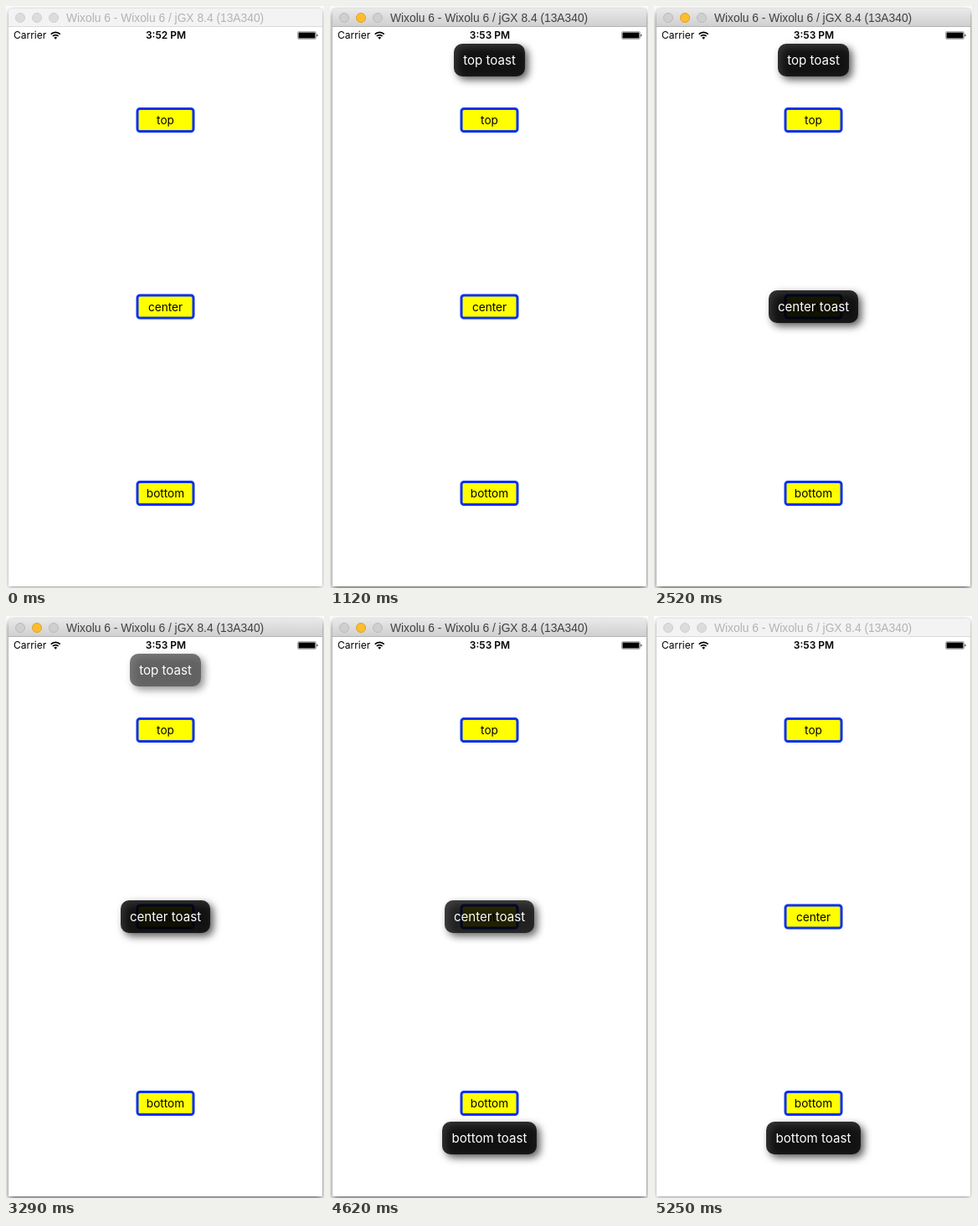
Animation, 380 px wide and 694 px high, one loop 5.32 s. Source, as an HTML page:

```html
<!DOCTYPE html>
<html lang="en">
<head>
<meta charset="utf-8">
<title>Toast demo</title>
<style>
  html, body { margin: 0; width: 100%; height: 100%; overflow: hidden; background: #fff; }
  .stage { position: relative; width: 380px; height: 694px; overflow: hidden; font-family: Inter, Roboto, sans-serif; color: #000; }
  .stage > *, .bar { position: absolute; box-sizing: border-box; white-space: nowrap; }

  /* Every state change is a hard step on one shared loop. */
  .window, .bar, .title, .dot, .before, .after, .toast { animation: 5320ms step-end infinite; }

  .window { left: 3px; top: 3px; width: 375px; height: 689px; border-radius: 4px 4px 0 0; background: #fff; animation-name: shade; }
  .bar { left: 0; top: 0; width: 100%; height: 22px; border-radius: 4px 4px 0 0; border-bottom: 1px solid; animation-name: bar; }
  .title { left: 72px; top: 5px; font: 13.8px/20px "Liberation Sans", Arial, sans-serif; animation-name: title; }
  .dot { top: 8px; width: 12px; height: 12px; border-radius: 50%; border: 1px solid; animation-name: dot; }
  .dot.mid { animation-name: dot-mid; }

  .status { top: 26px; height: 18px; line-height: 18px; font-size: 12px; }
  .clock { left: 141px; width: 100px; text-align: center; font-weight: 600; }
  .before { animation-name: before; }
  .after { animation-name: after; }
  .drawing { left: 0; top: 0; }

  .button rect { width: 67px; height: 27px; rx: 3px; fill: #ff0; stroke: #0b31f0; stroke-width: 3px; }
  .button text { font-size: 13.6px; text-anchor: middle; }

  .toast { height: 39px; line-height: 39px; border-radius: 10px; color: #fff; font-size: 15.1px; text-align: center; opacity: 0;
    background: rgba(0,0,0,.8); filter: url(#shadow); }
  .toast.top { left: 148px; top: 45px; width: 85px; animation-name: toast-top; }
  .toast.center { left: 137px; top: 339px; width: 107px; animation-name: toast-center; }
  .toast.bottom { left: 134px; top: 603px; width: 113px; animation-name: toast-bottom; }

  /* Window focus */
  @keyframes shade {
    0%, 98.68% { box-shadow: 0 0 1px rgba(0,0,0,.35), 0 2px 6px rgba(0,0,0,.35); }
    15.78% { box-shadow: 0 0 1px rgba(0,0,0,.4), 0 4px 9px rgba(0,0,0,.55); }
  }
  @keyframes bar {
    0%, 98.68% { background: #f3f3f3; border-color: #dadada; }
    15.78% { background: linear-gradient(#e9e9e9, #d0d0d0); border-color: #b4b4b4; }
  }
  @keyframes title {
    0%, 98.68% { color: #b3b3b3; }
    15.78% { color: #404040; }
  }
  @keyframes dot {
    0%, 98.68% { background: #dcdcdc; border-color: #cfcfcf; }
    15.78% { background: #cfcfcf; border-color: #bababa; }
  }
  @keyframes dot-mid {
    0%, 98.68% { background: #dcdcdc; border-color: #cfcfcf; }
    15.78% { background: #fdbd2f; border-color: #e0a025; }
  }

  /* Clock */
  @keyframes before { 0% { opacity: 1; } 15.78%, 100% { opacity: 0; } }
  @keyframes after { 0% { opacity: 0; } 15.78%, 100% { opacity: 1; } }

  /* Toasts */
  @keyframes toast-top {
    0% { opacity: 0; }
    17.1% { opacity: .25; } 18.42% { opacity: .57; } 19.73% { opacity: .88; } 21.05% { opacity: 1; }
    61.84% { opacity: .66; } 63.15% { opacity: .3; } 64.47%, 100% { opacity: 0; }
  }
  @keyframes toast-center {
    0% { opacity: 0; }
    43.42% { opacity: .33; } 44.73% { opacity: .67; } 46.05% { opacity: .94; } 47.36% { opacity: 1; }
    86.84% { opacity: .93; } 88.15% { opacity: .6; } 89.47% { opacity: .25; } 90.78%, 100% { opacity: 0; }
  }
  @keyframes toast-bottom {
    0% { opacity: 0; }
    67.1% { opacity: .23; } 68.42% { opacity: .56; } 69.73% { opacity: .88; } 71.05%, 100% { opacity: 1; }
  }
</style>
</head>
<body>
<div class="stage">
  <div class="window"><div class="bar"></div></div>
  <div class="dot" style="left:11px"></div>
  <div class="dot mid" style="left:31px"></div>
  <div class="dot" style="left:51px"></div>
  <div class="title">Wixolu 6 - Wixolu 6 / jGX 8.4 (13A340)</div>

  <div class="status" style="left:9px">Carrier</div>
  <div class="status clock before">3:52 PM</div>
  <div class="status clock after">3:53 PM</div>

  <svg class="drawing" width="380" height="694">
    <!-- The shadow also darkens the translucent toast from below. -->
    <filter id="shadow" x="-30%" y="-70%" width="160%" height="240%" color-interpolation-filters="sRGB">
      <feDropShadow dx="4" dy="4" stdDeviation="5" flood-color="#000" flood-opacity=".8"/>
    </filter>

    <path d="M53.7 33.6a7.8 7.8 0 0 1 11 0M55.8 36a4.8 4.8 0 0 1 6.8 0" fill="none" stroke="#000" stroke-width="1.7"/>
    <path d="M59.2 39.8l-1.9-2a2.7 2.7 0 0 1 3.8 0z"/>
    <rect x="348.5" y="30.5" width="22" height="9" rx="1.5" fill="none" stroke="#999" stroke-width=".8"/>
    <rect x="349.5" y="31.5" width="20" height="7" rx=".5"/>
    <path d="M371.5 33.5a1.6 1.6 0 0 1 0 3z"/>

    <g class="button"><rect x="157" y="122.5"/><text x="190.5" y="141">top</text></g>
    <g class="button"><rect x="157" y="345"/><text x="190.5" y="363.5">center</text></g>
    <g class="button"><rect x="157" y="567.5"/><text x="190.5" y="586">bottom</text></g>
  </svg>

  <div class="toast top">top toast</div>
  <div class="toast center">center toast</div>
  <div class="toast bottom">bottom toast</div>
</div>
</body>
</html>
```
